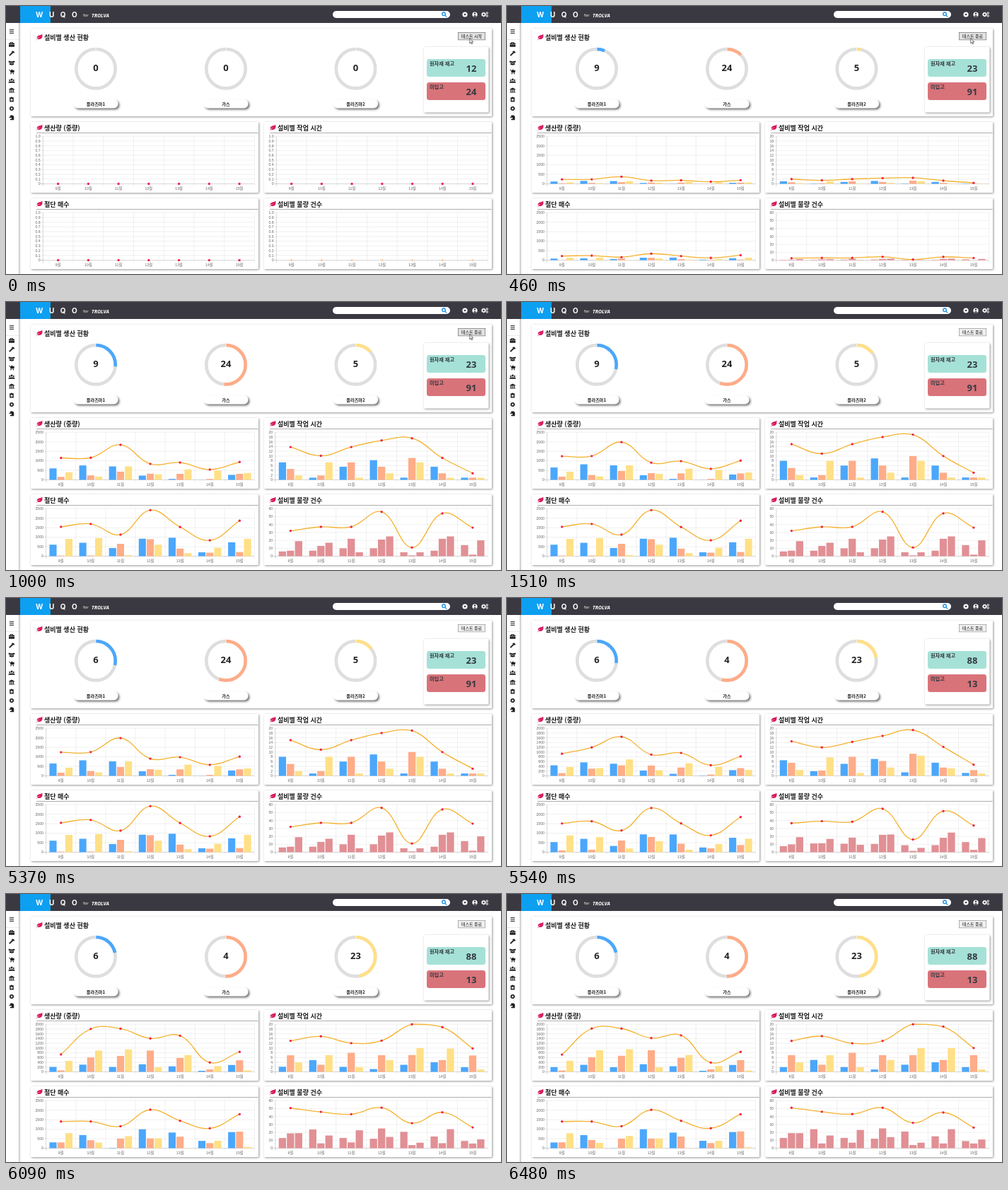
An HTML page for the animation above (6.9 s loop, 700x379 px).

```html
<!DOCTYPE html>
<html lang="ko">
<head>
<meta charset="utf-8">
<title>설비별 생산 현황</title>
<style>
  html, body { margin: 0; width: 100%; height: 100%; overflow: hidden; background: #fff; }
  svg { display: block; width: 700px; height: 379px; font-family: "Noto Sans CJK KR", "Noto Sans CJK", "Noto Sans", sans-serif; }
  .card { fill: #fff; filter: drop-shadow(1.2px 1.4px 1.4px rgba(0, 0, 0, .42)); }
  .pill { fill: #fff; filter: drop-shadow(2px 2.5px 1.6px rgba(0, 0, 0, .55)); }
  .side { fill: #fff; filter: drop-shadow(1px 0 1.5px rgba(0, 0, 0, .35)); }
  .title { font-size: 9px; font-weight: 700; fill: #1c1c1c; }
  .name { font-size: 6.2px; font-weight: 700; fill: #222; text-anchor: middle; }
  .tag { font-size: 7.2px; font-weight: 700; fill: #333a40; }
  .num { font: 700 13px "Open Sans", "Noto Sans", sans-serif; fill: #222; text-anchor: middle; }
  .box .num { fill: #333a40; }
  .axis { font: 5.2px "Liberation Sans", "Noto Sans CJK KR", "Noto Sans CJK", sans-serif; fill: #666; }
  .ring { fill: none; stroke-width: 4.6; }
  .btn text { font-size: 6px; fill: #111; text-anchor: middle; }
  .btn rect { fill: #efefef; stroke: #858585; stroke-width: .6; }
  .btn.hover rect { fill: #e2e2e2; stroke: #606060; }
</style>
</head>
<body>
<svg viewBox="0 0 700 379">
  <defs>
    <path id="leaf" fill="#d81b60" d="M.2 8.6C.8 6.6 2.2 5 5 4.2 3 4.3 1.8 5 .7 6.3.3 3.4 2 1.8 4.8 1.5 6.4 1.3 7.4.9 8.2 0 9.1 3 8.2 7 4.4 7.4 3 7.5 2 7.2 1.5 6.8 1.1 7.3.9 8 .7 8.7z"/>
    <g id="gear">
      <circle r="2" fill="none" stroke="currentColor" stroke-width="1.5"/>
      <circle r="2.9" fill="none" stroke="currentColor" stroke-width="1" stroke-dasharray="1.3 .98"/>
    </g>
  </defs>

  <rect class="side" y="20" width="18" height="365"/>
  <g stroke="#222" stroke-width="1"><path d="M5 33.6h6M5 36h6M5 38.4h6"/></g>
  <path d="M0 47.5h18" stroke="#ddd" stroke-width=".6"/>
  <g fill="#222" color="#222">
    <path d="M4 52.5h2v-1.6h4v1.6h2v2h-8zM4 55h8v2.8h-8zM7 51.7v.8h2v-.8z" fill-rule="evenodd"/>
    <path d="M7.3 64l3-.4 2 2-1.2 1.2-1-.6-4.6 4.6-1.3-1.3 4.4-4.4z"/>
    <path d="M4 77.5l4 1 4-1 .6 2-4.6 1.2-4.6-1.2zM4.8 80.6l3.2.8 3.2-.8v2.2l-3.2 1-3.2-1z"/>
    <path d="M4 90h1.7l.5 1h1.2v-1.2h2v1.2h2.6l-.8 3.2H6.4l-.9-3.4H4zM6.3 94.8h1.5v1.5H6.3zM9.6 94.8h1.5v1.5H9.6z"/>
    <circle cx="8" cy="104" r="1.5"/><circle cx="5.2" cy="105" r="1.1"/><circle cx="10.8" cy="105" r="1.1"/>
    <path d="M3.6 108.8v-1.6l1.8-.8h5.2l1.8.8v1.6z"/>
    <path d="M8 115.6l3.8 2v.8H4.2v-.8zM5 118.8h1.2v2.4H5zM7.4 118.8h1.2v2.4H7.4zM9.8 118.8H11v2.4H9.8zM4.2 121.4h7.6v1H4.2z"/>
    <path d="M5.2 129.2h1.6l1.2-1 1.2 1h1.6v6.2H5.2zM7.4 131v1.1H6.3v1.1h1.1v1.1h1.2v-1.1h1.1v-1.1H8.600V131z" fill-rule="evenodd"/>
    <use href="#gear" x="8" y="145"/>
    <path d="M6 154.600h3.600l1.600 1.600v5H6v-1.800h2v-1.400H4.400v-1.200H6z"/>
  </g>

  <rect width="700" height="24" fill="#3a3941"/>
  <rect x="20" y="-19" width="43" height="43" fill="#0d9ff0"/>
  <text x="42" y="16.300" fill="#fff" style="font:700 10px Inter,sans-serif;letter-spacing:8.500px">WUQO</text>
  <text x="109" y="15.300" fill="#e6d6cd" style="font:600 5.500px 'Open Sans',sans-serif">for</text>
  <text x="121" y="15.600" fill="#fff" style="font:italic 700 7px 'Open Sans',sans-serif">TROLVA</text>
  <rect x="462" y="7" width="166" height="10" rx="5" fill="#fff"/>
  <g fill="none" stroke="#1591e6" stroke-width="1.300"><circle cx="619" cy="11.300" r="2.300"/><path d="M620.700 13l2.300 2.400"/></g>
  <g fill="#fff" color="#fff">
    <circle cx="649" cy="12" r="3.600"/><circle cx="663" cy="12" r="3.600"/>
    <use href="#gear" x="675.500" y="12"/>
    <circle cx="680.300" cy="10" r="1.200" fill="none" stroke="#fff"/><circle cx="680.300" cy="14" r="1.200" fill="none" stroke="#fff"/>
  </g>
  <g fill="#3a3941"><circle cx="649" cy="12" r="1.300"/><circle cx="663" cy="10.800" r="1.200"/><path d="M660.900 14.400q2.100-2.800 4.200 0-2.100 1.600-4.200 0z"/></g>

  <rect class="card" x="35" y="32" width="652" height="124" rx="1"/>
  <use href="#leaf" x="43" y="39.700"/>
  <text class="title" x="54" y="47.600">설비별 생산 현황</text>
  <g id="donuts"></g>
  <rect class="card" x="591" y="58" width="91.500" height="92.500" rx="1"/>
  <g class="box">
    <rect x="595" y="75" width="83" height="25" rx="3.500" fill="#a6e1d7"/>
    <text class="tag" x="599" y="84.300">원자재 재고</text>
    <text class="num" id="stock" x="658" y="93"></text>
    <rect x="595" y="108" width="83" height="25" rx="3.500" fill="#d9737a"/>
    <text class="tag" x="599" y="117.300">미입고</text>
    <text class="num" id="due" x="658" y="126"></text>
  </g>
  <g class="btn" id="btn"><rect x="639.300" y="37.300" width="38.400" height="10.600"/><text x="658.500" y="44.800"></text></g>
  <g id="charts"></g>
  <path id="cursor" fill="#fff" stroke="#111" stroke-width=".6" d="M655.800 45.800v7l1.600-1.500 1.100 2.500 1.100-.5-1.100-2.400h2.200z"/>
</svg>
<script>
const LOOP = 6900, SECOND = 5475;
const $ = id => document.getElementById(id);
const clamp = (v, a, b) => Math.min(b, Math.max(a, v));
const mix = (a, b, k) => a + (b - a) * k;
const outQuart = (t, start, dur) => 1 - (1 - clamp((t - start) / dur, 0, 1)) ** 4;
const px = v => v.toFixed(2);

const BLUE = '#4ba7fb', ORANGE = '#ffac88', YELLOW = '#ffe086', ROSE = '#e19095';
const EMPTY = { max: 1, step: .1, width: 7.2 };
const scale = (max, step) => ({ max, step, width: 2.89 * String(max).length });

// Three bars per month; the line shows their sum.
const first = {
  weight: [648, 167, 426, 815, 255, 180, 760, 463, 760, 240, 350, 315, 50, 340, 590, 5, 50, 525, 280, 340, 390],
  hours: [8, 5, 2, 1, 2, 8, 6, 8, 1, 9, 6, 3, 1, 10, 8, 6, 3, 1, 1, 1, 1],
  sheets: [605, 30, 910, 705, 35, 955, 430, 650, 55, 920, 895, 605, 970, 400, 165, 205, 185, 445, 730, 220, 915],
  faults: [6, 7, 19, 7, 13, 17, 10, 22, 5, 10, 21, 25, 5, 1, 5, 7, 22, 25, 14, 2, 20]
};
const second = {
  weight: [200, 60, 465, 295, 615, 910, 195, 675, 950, 320, 910, 190, 235, 590, 710, 45, 105, 240, 290, 490, 60],
  hours: [2, 7, 4, 5, 3, 7, 2, 8, 2, 1, 7, 5, 3, 7, 10, 4, 5, 10, 2, 7, 1],
  sheets: [300, 310, 790, 690, 430, 280, 10, 500, 645, 995, 505, 515, 820, 610, 10, 390, 270, 390, 850, 885, 50],
  faults: [13, 19, 19, 24, 6, 16, 13, 7, 23, 12, 25, 14, 21, 4, 7, 15, 6, 24, 9, 6, 11]
};
const bars = [BLUE, ORANGE, YELLOW], roses = [ROSE, ROSE, ROSE];
const charts = [
  { key: 'weight', title: '생산량 (중량)', x: 35, y: 164, start: 397, dur: 1250, a: scale(2500, 500), b: scale(2000, 200), fills: bars },
  { key: 'hours', title: '설비별 작업 시간', x: 365, y: 164, start: 417, dur: 1250, a: scale(20, 2), b: scale(20, 2), fills: bars },
  { key: 'sheets', title: '절단 매수', x: 35, y: 272, start: 446, dur: 400, a: scale(2500, 500), b: scale(2500, 500), fills: bars },
  { key: 'faults', title: '설비별 불량 건수', x: 365, y: 272, start: 453, dur: 400, a: scale(60, 10), b: scale(60, 10), fills: roses, idle: '#ffcfa3' }
];
const donuts = [
  { name: '플라즈마1', x: 127, color: BLUE, a: .286, b: .215, nums: [0, 9, 6], swap: 5370 },
  { name: '가스', x: 311, color: ORANGE, a: .555, b: .5, nums: [0, 24, 4], swap: 5450 },
  { name: '플라즈마2', x: 494.5, color: YELLOW, a: .145, b: .475, nums: [0, 5, 23], swap: 5450 }
];

const HEIGHT = 67.3, R = 27.7, ROUND = 2 * Math.PI * R;

$('donuts').innerHTML = donuts.map(d => `
  <circle class="ring" cx="${d.x}" cy="88.7" r="${R}" stroke="#dedede"/>
  <circle class="ring arc" cx="${d.x}" cy="88.7" r="${R}" stroke="${d.color}" transform="rotate(-90 ${d.x} 88.7)"/>
  <path d="M${d.x} 58v5.500" stroke="#fff" stroke-width=".6"/>
  <text class="num" x="${d.x}" y="92.300"></text>
  <rect class="pill" x="${d.x - 31.500}" y="132" width="63" height="12.500" rx="6"/>
  <text class="name" x="${d.x}" y="140.600">${d.name}</text>`).join('');

$('charts').innerHTML = charts.map(c => `
  <rect class="card" x="${c.x}" y="${c.y}" width="322" height="100" rx="1"/>
  <use href="#leaf" x="${c.x + 8}" y="${c.y + 3.700}"/>
  <text class="title" x="${c.x + 19}" y="${c.y + 11.600}">${c.title}</text>
  <path d="M${c.x + 8} ${c.y + 15.500}h313.500" stroke="#999" stroke-width=".8"/>
  <g class="plot"></g>`).join('');

const arcs = document.querySelectorAll('.arc');
const counts = document.querySelectorAll('#donuts .num');
const plots = document.querySelectorAll('.plot');

function drawAxis(s, left, right, top) {
  const base = top + HEIGHT, cell = (right - left) / 7, rows = Math.round(s.max / s.step);
  let out = '';
  const rule = (d, strong) => out += `<path d="${d}" stroke="#000" stroke-opacity="${strong ? .27 : .1}" stroke-width=".6"/>`;
  for (let i = 0; i <= rows; i++) {
    const y = base - HEIGHT * i / rows;
    const label = i && s.step < 1 ? (i * s.step).toFixed(1) : i * s.step;
    rule(`M${px(left - 3.5)} ${px(y)}H${px(right)}`, !i);
    out += `<text class="axis" x="${px(left - 3.7)}" y="${px(y + 1.9)}" text-anchor="end">${label}</text>`;
  }
  for (let i = 0; i <= 7; i++) {
    const x = left + cell * i;
    rule(`M${px(x)} ${top}V${px(base + 3.5)}`, !i);
    if (i < 7) out += `<text class="axis" x="${px(x + cell / 2)}" y="${px(base + 8.8)}" text-anchor="middle">${i + 9}월</text>`;
  }
  return out;
}

// Smooth curve with tension .4, its handles kept inside the plot.
function curve(p, top, base) {
  const handles = p.map((q, i) => {
    const a = p[i - 1] || q, b = p[i + 1] || q;
    const da = Math.hypot(q[0] - a[0], q[1] - a[1]), db = Math.hypot(b[0] - q[0], b[1] - q[1]);
    const at = k => [q[0] + k * (b[0] - a[0]), clamp(q[1] + k * (b[1] - a[1]), top, base)];
    return [at(-.4 * da / (da + db)), at(.4 * db / (da + db))];
  });
  const pt = q => q.map(px).join(' ');
  return 'M' + pt(p[0]) + p.slice(1).map((q, i) =>
    `C${pt(handles[i][1])} ${pt(handles[i + 1][0])} ${pt(q)}`).join('');
}

function drawChart(c, t) {
  const live = t >= c.start, again = t >= SECOND;
  const s = !live ? EMPTY : again ? c.b : c.a;
  const left = c.x + 10.1 + s.width, right = c.x + 316.4, top = c.y + 20.2, base = top + HEIGHT;
  const cell = (right - left) / 7, slot = cell * .8 / 3;
  const e = again ? outQuart(t, SECOND, 1000) : outQuart(t, c.start, c.dur);
  const rise = (v1, v2) => {
    const h1 = v1 / c.a.max * HEIGHT;
    return again ? mix(h1, v2 / c.b.max * HEIGHT, e) : live ? h1 * e : 0;
  };
  let out = drawAxis(s, left, right, top);
  const points = [];
  for (let m = 0; m < 7; m++) {
    const mid = left + cell * (m + .5);
    let sum1 = 0, sum2 = 0;
    for (let k = 0; k < 3; k++) {
      const v1 = first[c.key][m * 3 + k], v2 = second[c.key][m * 3 + k], h = rise(v1, v2);
      sum1 += v1;
      sum2 += v2;
      if (live) out += `<rect x="${px(mid + (k - 1.5) * slot + slot * .05)}" y="${px(base - h)}" width="${px(slot * .9)}" height="${px(h)}" fill="${c.fills[k]}"/>`;
    }
    points.push([mid, base - rise(sum1, sum2)]);
  }
  if (live) out += `<path d="${curve(points, top, base)}" fill="none" stroke="#f4b22f" stroke-width="1.3"/>`;
  const dot = !live && c.idle || '#f0244f';
  return out + points.map(p => `<circle cx="${px(p[0])}" cy="${px(p[1])}" r="1.7" fill="${dot}"/>`).join('');
}

const setText = (node, v) => { if (node.textContent !== String(v)) node.textContent = v; };
const pick = (t, swap, list) => list[t < 320 ? 0 : t < swap ? 1 : 2];

function render(t) {
  donuts.forEach((d, i) => {
    const part = t < SECOND ? d.a * outQuart(t, 380, 1300) : mix(d.a, d.b, outQuart(t, SECOND, 1000));
    arcs[i].setAttribute('stroke-dasharray', `${px(part * ROUND)} 400`);
    arcs[i].setAttribute('visibility', part > 0 ? 'visible' : 'hidden');
    setText(counts[i], pick(t, d.swap, d.nums));
  });
  setText($('stock'), pick(t, 5450, [12, 23, 88]));
  setText($('due'), pick(t, 5450, [24, 91, 13]));
  setText($('btn').lastChild, t < 240 ? '테스트 시작' : '테스트 종료');
  const hover = t < 1040;
  $('btn').classList.toggle('hover', hover);
  $('cursor').setAttribute('visibility', hover ? 'visible' : 'hidden');
  charts.forEach((c, i) => {
    const html = drawChart(c, t);
    if (c.html !== html) plots[i].innerHTML = c.html = html;
  });
}

function tick() {
  render(performance.now() % LOOP);
  requestAnimationFrame(tick);
}
tick();
</script>
</body>
</html>
```
